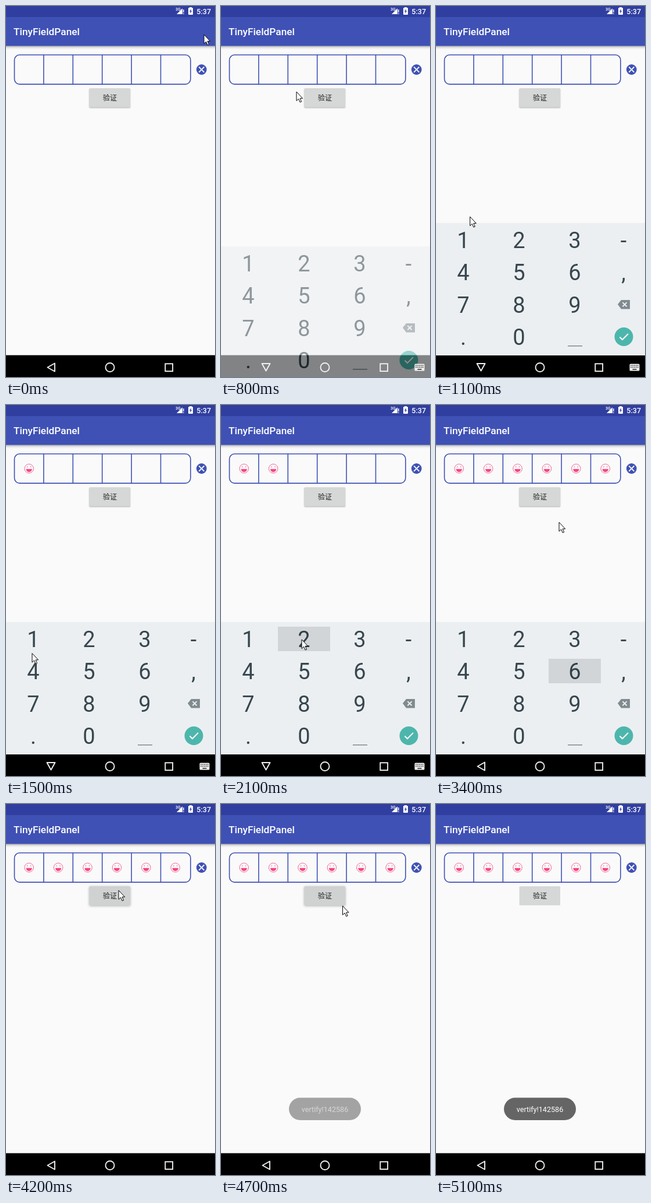
Animation, 360 px wide and 636 px high, one loop 5.9 s. Source, as an HTML page with a canvas:

```html
<!DOCTYPE html>
<html lang="en">
<head>
<meta charset="utf-8">
<title>Code entry</title>
<style>
  html, body { margin: 0; width: 100%; height: 100%; overflow: hidden; background: #fafafa; }
  canvas { display: block; width: 360px; height: 636px; }
</style>
</head>
<body>
<canvas id="stage" width="360" height="636"></canvas>
<script>
const LOOP = 5900, STEP = 100;
const BLUE = '#3f51b5', DARK_BLUE = '#303f9f', PINK = '#f5457f', INK = '#37474f';
const ROWS = ['123-', '456,', '789', '.0'];
const CODE = '142586';
const CELL = 50.4, LEFT = 14.5;
const screen = document.getElementById('stage').getContext('2d');
let g = screen;

// Each key fills a cell when it is let go
const letGo = [1400, 1900, 2200, 2500, 2800, 3300];
const presses = letGo.map((up, i) => {
  const row = ROWS.findIndex(keys => keys.includes(CODE[i]));
  return { down: up - STEP, up, row, col: ROWS[row].indexOf(CODE[i]) };
});

// Pointer stops: time, x, y
const route = [
  [0, 341, 49], [400, 143, 109], [600, 143, 109], [800, 130, 147],
  ...presses.flatMap(({ down, up, row, col }) =>
    [down, up].map(t => [t, 45 + 94 * col, 402 + 54 * row])),
  [3400, 212, 201], [3600, 194, 148], [4600, 194, 148], [4900, 222, 196], [5000, 328, 260]
];

const clamp = v => Math.max(0, Math.min(1, v));
const easeOut = v => 1 - (1 - v) ** 2;
const mix = (a, b, k) => a + (b - a) * k;

function rect(x, y, w, h, color) {
  g.fillStyle = color;
  g.fillRect(x, y, w, h);
}

function round(x, y, w, h, r, color) {
  g.beginPath();
  g.roundRect(x, y, w, h, r);
  g.fillStyle = color;
  g.fill();
}

function disc(x, y, r, color) {
  g.beginPath();
  g.arc(x, y, r, 0, 7);
  g.fillStyle = color;
  g.fill();
}

function ring(x, y, r, color, width) {
  g.beginPath();
  g.arc(x, y, r, 0, 7);
  g.strokeStyle = color;
  g.lineWidth = width;
  g.stroke();
}

function trace(points, close) {
  g.beginPath();
  points.forEach(([x, y]) => g.lineTo(x, y));
  if (close) g.closePath();
}

function fillPoly(points, color) {
  trace(points, true);
  g.fillStyle = color;
  g.fill();
}

function line(points, color, width, close) {
  trace(points, close);
  g.strokeStyle = color;
  g.lineWidth = width;
  g.stroke();
}

function cross(x, y, r, color, width) {
  for (const s of [r, -r]) line([[x - r, y - s], [x + r, y + s]], color, width);
}

function text(str, x, y, font, color, align = 'center') {
  g.font = font;
  g.textAlign = align;
  g.fillStyle = color;
  g.fillText(str, x, y);
}

function shadow(alpha, blur, dy) {
  g.shadowColor = `rgba(0,0,0,${alpha})`;
  g.shadowBlur = blur;
  g.shadowOffsetY = dy;
}

function drawBars() {
  rect(0, 0, 360, 636, '#fafafa');
  shadow(.45, 5, 2);
  rect(-9, 18, 378, 50.4, BLUE);
  shadow(0, 0, 0);
  rect(0, 0, 360, 19, DARK_BLUE);
  text('TinyFieldPanel', 13, 50, '500 17.3px Roboto, sans-serif', '#fff', 'left');

  text('3G', 292, 8, '500 7px Roboto, sans-serif', '#fff', 'left');
  fillPoly([[294, 14], [304, 4], [304, 14]], '#fff');
  rect(305, 6, 1.5, 5, '#fff');
  rect(305, 12.5, 1.5, 1.5, '#fff');
  rect(316, 2, 4, 2, '#fff');
  round(314, 3, 8, 12, 1, '#fff');
  fillPoly([[319, 5], [315.8, 9.6], [317.7, 9.6], [317, 13], [320.3, 8.4], [318.4, 8.4]], DARK_BLUE);
  text('5:37', 353, 13.5, '500 12.5px Roboto, sans-serif', '#fff', 'right');
}

function drawFace(x, y) {
  ring(x, y, 7.8, PINK, .8);
  g.beginPath();
  g.arc(x, y + .8, 5.1, 0, Math.PI);
  g.fillStyle = PINK;
  g.fill();
  for (const side of [-3, 3]) disc(x + side, y - 3, .8, PINK);
}

function drawField(t) {
  g.beginPath();
  g.roundRect(LEFT, 83.7, CELL * 6 + 1, 50.4, 9);
  g.strokeStyle = BLUE;
  g.lineWidth = 1.6;
  g.stroke();
  presses.forEach(({ up }, i) => {
    const x = LEFT + CELL * i;
    if (i) line([[x, 84], [x, 134]], BLUE, 1.6);
    if (t >= up) drawFace(x + CELL / 2, 109);
  });
  disc(336.8, 109, 8.9, BLUE);
  cross(336.8, 109, 4.6, '#fff', 1.8);
}

function drawButton(t) {
  const down = t >= 4200 && t < 4900;
  if (t < 4900) shadow(.3, down ? 4 : 2, 1);
  round(143.5, 141, 70.5, 32.7, 1.5, down ? '#d0d2d2' : '#d6d7d7');
  shadow(0, 0, 0);
  text('验证', 179, 161.5, '12.2px "Noto Sans CJK SC", "Noto Sans CJK", sans-serif', '#212121');
}

function makeKeyboard() {
  const pad = document.createElement('canvas');
  pad.width = 360;
  pad.height = 227;
  g = pad.getContext('2d');
  g.translate(0, -372);
  rect(0, 372, 360, 227, '#eceff1');
  ROWS.forEach((keys, row) => [...keys].forEach((key, col) => {
    text(key, Math.min(47 + 96 * col, 323), 415 + 55.3 * row, '38px Roboto, sans-serif', INK);
  }));
  rect(227, 582, 25, 1.5, '#7f8a8f');
  fillPoly([[313, 511.5], [319, 504], [334, 504], [334, 519.5], [319, 519.5]], '#808b90');
  cross(325, 511.7, 3.6, '#eceff1', 2);
  disc(323.5, 567, 16, '#4db6ac');
  line([[316.5, 567.5], [321, 572], [331, 562]], '#fff', 2);
  g = screen;
  return pad;
}

const keyboard = makeKeyboard();

function drawKeyboard(t) {
  if (t < 700 || t >= 3600) return;
  const p = t < 3500 ? clamp((t - 600) / 400) : .4;
  g.globalAlpha = mix(.1, 1, p);
  g.drawImage(keyboard, 0, 372 + Math.round(80 * (1 - p)));
  g.globalAlpha = 1;
  // The last key stays lit while the keyboard closes
  const lit = presses.find(({ down, up }, i) => t >= down && t < (i === 5 ? 3500 : up));
  if (lit) rect(2 + 96 * lit.col, 380 + 55 * lit.row, 90, 42, 'rgba(0,0,0,.11)');
}

function drawNav(t) {
  const open = t >= 700 && t < 3400, white = '#f0f0f0';
  g.save();
  g.lineJoin = 'round';
  g.translate(77.5, 619.5);
  if (open) g.rotate(-Math.PI / 2);
  line([[-6, 0], [6.5, -7], [6.5, 7]], white, 1.9, true);
  g.restore();
  ring(179, 619.5, 7.5, white, 1.9);
  g.strokeRect(274.3, 613.3, 12.8, 12.8);
  if (!open) return;
  round(333.5, 613.5, 17, 12, 1.5, white);
  for (let i = 0; i < 10; i++) rect(335.3 + 2.9 * (i % 5), i < 5 ? 615.5 : 618.5, 1.6, 1.6, '#333');
  rect(338.5, 622, 7, 1.6, '#333');
}

function drawToast(t) {
  g.globalAlpha = clamp((t - 4300) / 700);
  round(117, 503.5, 124, 38.5, 19.25, '#656565');
  text('vertify!142586', 179, 527.5, '12.6px Roboto, sans-serif', '#fff');
  g.globalAlpha = 1;
}

function drawPointer(t) {
  const i = route.findIndex(stop => stop[0] > t);
  if (i < 0) return;
  const [t0, x0, y0] = route[i - 1], [t1, x1, y1] = route[i];
  const k = easeOut((t - t0) / (t1 - t0));
  g.save();
  g.translate(mix(x0, x1, k), mix(y0, y1, k));
  const arrow = [[0, 0], [0, 15.5], [3.6, 12.2], [6.2, 18], [8.6, 17], [6.1, 11.3], [10.6, 11.3]];
  fillPoly(arrow, '#fff');
  line(arrow, '#000', 1, true);
  g.restore();
}

function draw(t) {
  drawBars();
  drawField(t);
  drawButton(t);
  rect(0, 598.6, 360, 38, '#000');
  drawKeyboard(t);
  drawNav(t);
  drawToast(t);
  drawPointer(t);
}

const begin = performance.now();
function tick() {
  const t = (performance.now() - begin) % LOOP;
  draw(Math.floor(t / STEP) * STEP);
  requestAnimationFrame(tick);
}
tick();
</script>
</body>
</html>
```
